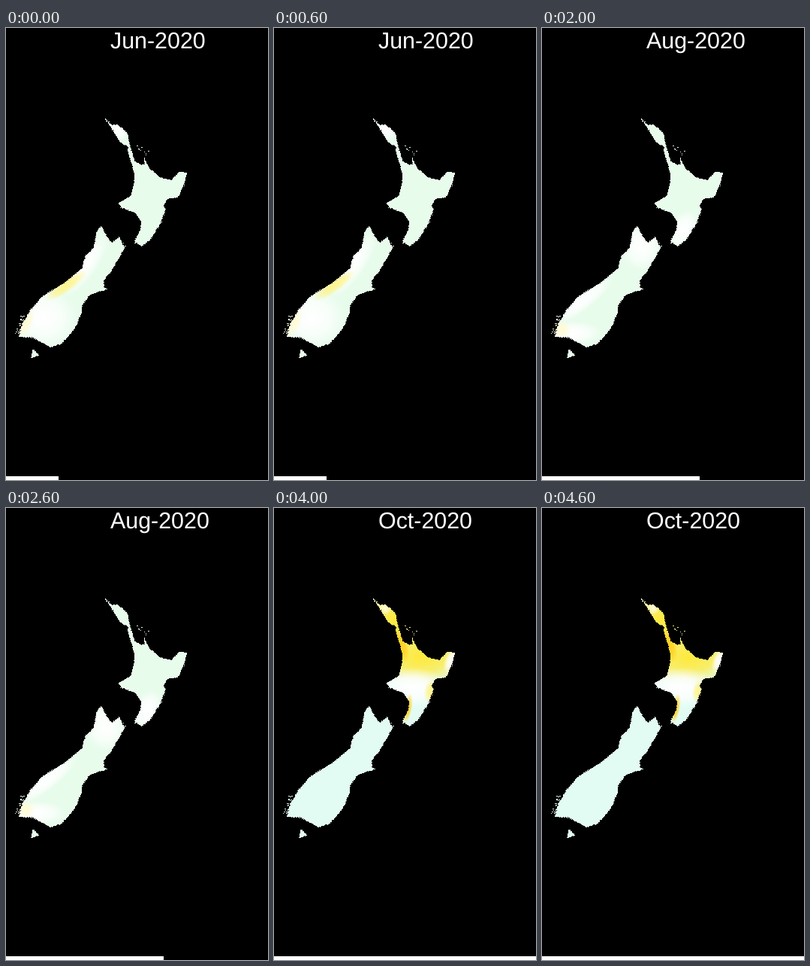
Recreate the animation shown at these times as an HTML page with a canvas. Size 349 by 600 pixels, loop 5 s.

```html
<!DOCTYPE html>
<html lang="en">
<head>
<meta charset="utf-8">
<title>Monthly map</title>
<style>
html, body { margin: 0; width: 100%; height: 100%; overflow: hidden; background: #000; }
canvas, svg { position: absolute; left: 0; top: 0; }
text {
  fill: #fff; font: 30.4px "Liberation Sans", Arial, sans-serif;
  text-rendering: geometricPrecision;
}
</style>
</head>
<body>
<canvas id="map" width="349" height="600"></canvas>
<svg width="349" height="600"><text id="label" x="139" y="27"></text></svg>
<script>
const W = 349, H = 600, STEP = 1000;
const ctx = document.getElementById('map').getContext('2d');
const label = document.getElementById('label');

// Key points of each coast; the ragged detail comes from noise
const coasts = [
  `130,117 141,129 149,128 162,140 165,155 171,176 180,182 185,181 183,169
   190,185 205,198 220,202 231,191 241,192 237,209 229,225 215,227 210,236
   213,240 207,257 193,280 181,290 171,283 179,268 180,257 172,245 153,238
   150,232 166,223 171,204 171,193 162,163 163,158 152,152 139,131`,
  `127,263 135,278 141,285 151,277 158,292 141,322 130,335 131,345 137,346
   112,354 101,369 101,378 91,400 74,419 60,424 35,411 17,410 22,392 32,375
   49,356 78,338 101,319 106,302 117,292 120,271`,
  '36,426 44,435 33,438'
].map(points => new Path2D('M' + points + 'Z'));

function makeRandom(seed) {
  return () => (seed = (seed * 16807) % 2147483647) / 2147483647;
}

function layer() {
  const c = document.createElement('canvas');
  c.width = W;
  c.height = H;
  return c.getContext('2d');
}

function makeLand() {
  const land = layer();
  const random = makeRandom(2020);
  const rough = () => 0.5 + (random() - 0.5) * 1.2;
  for (let y = 112; y < 445; y++) {
    for (let x = 10; x < 246; x++) {
      const px = x + rough(), py = y + rough();
      if (coasts.some(c => land.isPointInPath(c, px, py))) land.fillRect(x, y, 1, 1);
    }
  }
  // Small islands strewn along a line
  const scatter = (n, x0, y0, x1, y1, spread) => {
    for (let i = 0; i < n; i++) {
      const t = random();
      const x = x0 + (x1 - x0) * t + (random() - 0.5) * spread;
      const y = y0 + (y1 - y0) * t + (random() - 0.5) * spread;
      land.fillRect(Math.round(x), Math.round(y), 1 + i % 2, 1);
    }
  };
  scatter(36, 15, 408, 23, 380, 7);
  scatter(9, 170, 152, 187, 167, 8);
  scatter(7, 168, 281, 174, 286, 3);
  scatter(5, 148, 277, 158, 290, 4);
  return land.canvas;
}

const white = '#ffffff', mint = '#e8fcec', ice = '#e2fcf4';
const cream = '#fffbd4', lemon = '#fff48c', yellow = '#ffe93c', amber = '#ffd020';

let pen;
function blob(color, x, y, rx, ry, turn = 0) {
  const g = pen.createRadialGradient(0, 0, 0, 0, 0, 1);
  g.addColorStop(0, color);
  g.addColorStop(0.5, color + 'c0');
  g.addColorStop(1, color + '00');
  pen.save();
  pen.translate(x, y);
  pen.rotate(turn * Math.PI / 180);
  pen.scale(rx, ry);
  pen.fillStyle = g;
  pen.fillRect(-1, -1, 2, 2);
  pen.restore();
}

const months = [
  ['Jun', () => {
    blob(white, 150, 136, 14, 14);
    blob(white, 50, 385, 45, 40);
    blob(white, 105, 315, 16, 50, 35);
    blob(lemon, 80, 342, 34, 9, -35);
    blob(cream, 26, 392, 9, 22, 25);
  }],
  ['Jul', () => {
    blob(white, 195, 215, 50, 50);
    blob(lemon, 203, 245, 7, 20, 15);
    blob(cream, 230, 207, 9, 18, 25);
  }],
  ['Aug', () => {
    blob(white, 188, 268, 18, 28, 25);
    blob(white, 132, 290, 28, 32);
    blob(white, 55, 362, 50, 12, -38);
    blob(white, 40, 405, 40, 16);
    blob(cream, 25, 400, 14, 12);
  }],
  ['Sep', () => {
    blob(white, 200, 205, 45, 24, 25);
    blob(lemon, 205, 200, 30, 8, 25);
    blob(white, 100, 342, 45, 12, -22);
  }],
  ['Oct', () => {
    pen.fillStyle = ice;
    pen.fillRect(0, 0, W, H);
    blob(yellow, 158, 150, 40, 45);
    blob(yellow, 195, 198, 65, 38);
    blob(amber, 170, 182, 9, 24, -15);
    blob(cream, 148, 133, 9, 9);
    blob(white, 185, 238, 46, 27);
    blob(white, 236, 203, 9, 18, 20);
    blob(lemon, 208, 243, 8, 16, 10);
    blob(amber, 178, 266, 6, 20, 10);
  }]
];

const land = makeLand();
const maps = months.map(([, paint]) => {
  pen = layer();
  pen.fillStyle = mint;
  pen.fillRect(0, 0, W, H);
  paint();
  pen.globalCompositeOperation = 'destination-in';
  pen.drawImage(land, 0, 0);
  return pen.canvas;
});

function draw(now) {
  const i = Math.floor(now / STEP) % months.length;
  ctx.fillStyle = '#000';
  ctx.fillRect(0, 0, W, H);
  ctx.drawImage(maps[i], 0, 0);
  ctx.fillStyle = '#fff';
  ctx.fillRect(0, H - 5, 70 * (i + 1), 5);
  label.textContent = months[i][0] + '-2020';
}

const start = performance.now();
function tick() {
  draw(performance.now() - start);
  requestAnimationFrame(tick);
}
tick();
</script>
</body>
</html>
```
